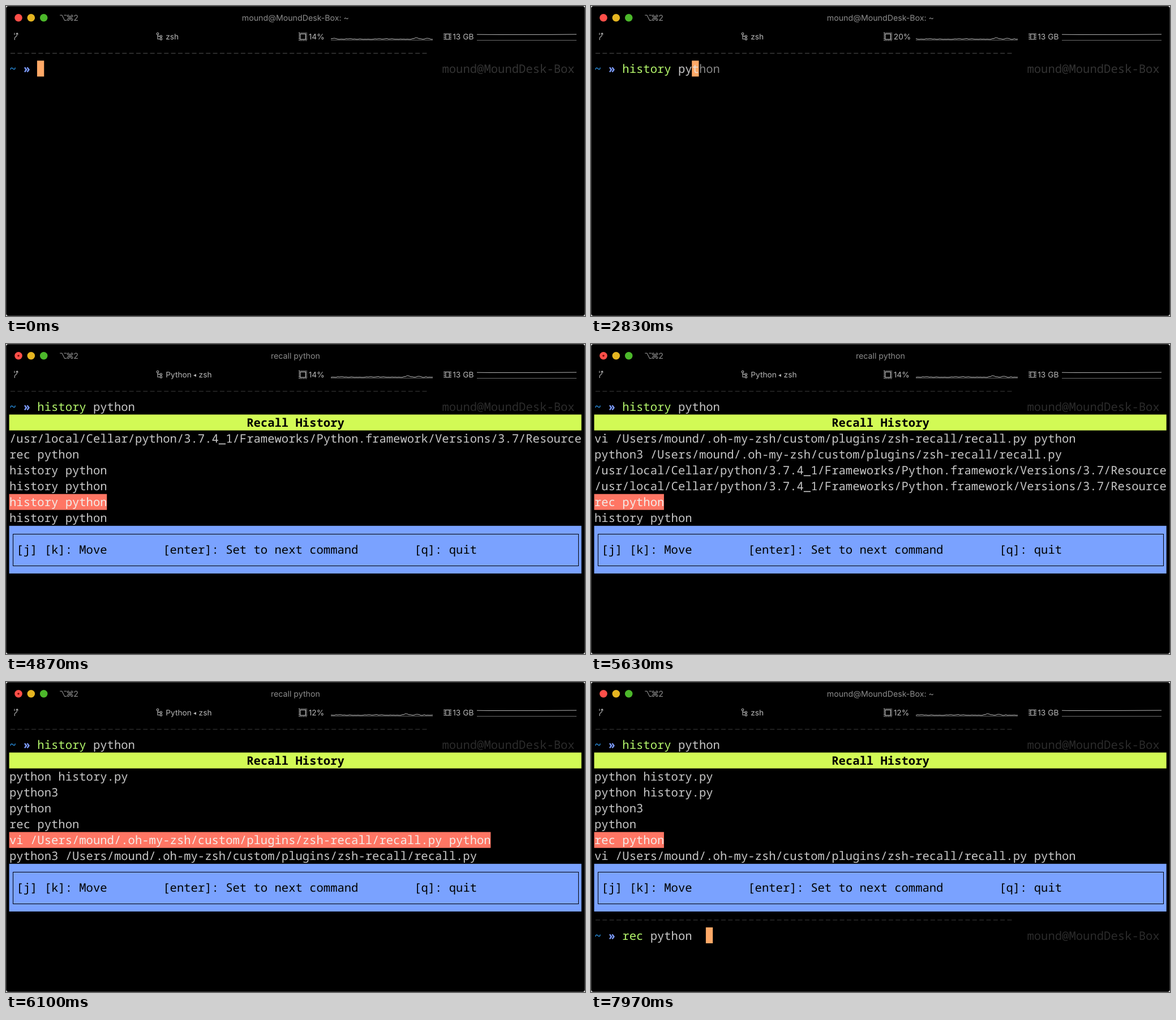
Write an HTML page that moves like this. It is 1023 px wide and 547 px high and loops after 8000 ms.

```html
<!DOCTYPE html>
<html lang="en">
<head>
<meta charset="utf-8">
<title>Recall history</title>
<style>
  html, body { margin: 0; width: 100%; height: 100%; overflow: hidden; background: #fff; }
  svg { display: block; width: 1023px; height: 547px; }
  text { white-space: pre; text-rendering: geometricPrecision; }
  .term text { font: 20.55px "Noto Sans Mono", "DejaVu Sans Mono", monospace; }
  .term .bold { font-weight: 600; }
  .ui { font: 13.7px Inter, Roboto, "DejaVu Sans", sans-serif; fill: #b8b8b8; }
  .title { font-size: 14.2px; fill: #8c8c8c; }
  .icon { fill: none; stroke: #b8b8b8; stroke-width: 1.1; }
  .base { stroke: #6c6c6c; }
  .spark { fill: none; stroke: #b4b4b4; stroke-linejoin: round; }
</style>
</head>
<body>
<svg viewBox="0 0 1023 547">
  <rect x=".5" y=".5" width="1022" height="546" rx="3.5" stroke="#3a3a3a"/>
  <circle cx="22" cy="20.7" r="6.8" fill="#ff4f49"/>
  <circle cx="44.3" cy="20.7" r="6.8" fill="#e5b521"/>
  <circle cx="66.7" cy="20.7" r="6.8" fill="#4cb82b"/>
  <circle id="busy" cx="22" cy="20.7" r="1.8" fill="#7a0d08"/>

  <g class="icon">
    <path d="M15 47.5v3.5M15.2 60v-2.5q0-2.5 2.2-3.6t2.2-3.4v-2.5M17.6 50l2-2.4 2 2.4"/>
    <circle cx="268" cy="49" r="1.8"/>
    <circle cx="274" cy="53.4" r="1.7"/>
    <circle cx="274" cy="58.2" r="1.7"/>
    <path d="M268 50.8v7.4h4.2M268 53.4h4.2"/>
    <rect x="519.8" y="49.3" width="9.6" height="9.6" stroke-width="1.2"/>
    <rect x="518" y="47.5" width="13.2" height="13.2" stroke-width="2" stroke-dasharray="1 1.64"/>
    <rect x="777" y="49.5" width="6.2" height="9.4"/>
    <path d="M774.8 49v11M785.4 49v11" stroke-width="3" stroke-dasharray="1.2 1.7"/>
    <path d="M773.3 49.4h13.6"/>
  </g>
  <g class="ui">
    <text class="title" x="94 106 119.3" y="26">⌥⌘2</text>
    <text class="title" id="title" x="511.4" y="26" text-anchor="middle"></text>
    <text id="job" x="282.3" y="59">zsh</text>
    <g id="parent">
      <text x="331" y="58" font-size="10">◂</text>
      <text x="340.6" y="59">zsh</text>
    </g>
    <text id="cpu" x="534.8" y="59"></text>
    <text x="789.3" y="59">13 GB</text>
  </g>
  <path class="base" d="M574 60.2H754M832 60.5H1008"/>
  <path class="spark" id="load"/>
  <path class="spark" id="memory"/>
  <g class="term" id="term"></g>
</svg>
<script>
const LOOP = 8000, CELL = 12.33, LINE = 28.05, LEFT = 6, TOP = 96.4, COLS = 82;
const USER = 'mound', HOST = 'MoundDesk-Box';
const COMMAND = 'history python';
const GREY = '#c7c7c7', GREEN = '#b5f86c', ORANGE = '#ffa967', SALMON = '#ff7664';

const SCRIPT = `/Users/${USER}/.oh-my-zsh/custom/plugins/zsh-recall/recall.py`;
const FRAMEWORK = '/usr/local/Cellar/python/3.7.4_1/Frameworks/Python.framework/Versions/3.7/Resources'.slice(0, COLS);
const HISTORY = [
  'python history.py', 'python history.py', 'python3', 'python', 'rec python',
  `vi ${SCRIPT} python`, `python3 ${SCRIPT}`, FRAMEWORK, FRAMEWORK, 'rec python',
  COMMAND, COMMAND, COMMAND, COMMAND
];
const VISIBLE = 6;

// Event times in ms.
const KEYS = [1080, 1200, 1310, 1420, 1540, 1650, 1780, 1980, 2480, 2640, 2920, 3040, 3150, 3260];
const MOVES = [4620, 4950, 5230, 5500, 5760, 5920, 6000, 6090, 6330];
const ENTER = 3800, MENU = 4190, JOB = 4770, QUIT = 7150, SPACE = 7650, JOB_END = 7200;
const TICK = 770;
const CPU = [14, 14, 16, 20, 14, 14, 12, 12, 12];

const $ = id => document.getElementById(id);
const count = (times, t) => times.filter(s => s <= t).length;
const rowY = row => TOP + row * LINE;
const colX = col => LEFT + col * CELL;

const text = (col, row, str, fill, cls = '') =>
  `<text class="${cls}" x="${colX(col)}" y="${rowY(row) + 21.6}" fill="${fill}">${str}</text>`;
const block = (col, row, cols, rows, fill) =>
  `<rect x="${colX(col) - .4}" y="${rowY(row)}" width="${cols * CELL}" height="${rows * LINE}" fill="${fill}"/>`;
const cursor = (col, row) => block(col, row, 1, 1, ORANGE);

function prompt(row, dim) {
  const y = rowY(row) - 12.9;
  return `<path d="M8 ${y}H745" stroke="${dim ? '#2a2a2a' : '#3a3a3a'}" stroke-width="1.5" stroke-dasharray="8 4.33"/>`
    + text(0, row, '~', '#2580c8', 'bold') + text(2, row, '»', '#7d9cff', 'bold')
    + text(62, row, `${USER}@${HOST}`, dim ? '#2b2b2b' : '#333');
}

function commandLine(t) {
  const n = count(KEYS, t);
  const typed = COMMAND.slice(0, n);
  const hint = n ? COMMAND.slice(n, n < 8 ? 7 : undefined) : '';
  let out = t < ENTER ? cursor(4 + n, 0) : '';
  out += text(4, 0, typed.slice(0, 7), n < 7 ? SALMON : GREEN);
  out += text(12, 0, typed.slice(8), GREY);
  out += text(4 + n, 0, hint.slice(0, 1), '#e8e0d8');
  out += text(5 + n, 0, hint.slice(1), '#858585');
  return out;
}

function menu(t) {
  const selected = HISTORY.length - 1 - count(MOVES, t);
  const first = Math.min(selected - 4, HISTORY.length - VISIBLE);
  let out = block(0, 1, COLS, 1, '#d2fa55') + text(34, 1, 'Recall History', '#000', 'bold');
  HISTORY.slice(first, first + VISIBLE).forEach((line, i) => {
    const on = first + i === selected;
    if (on) out += block(0, 2 + i, line.length, 1, SALMON);
    out += text(0, 2 + i, line, on ? '#f2ece8' : GREY);
  });
  out += block(0, 8, COLS, 3, '#7aa2ff');
  out += `<rect x="12.5" y="335.5" width="999" height="56" fill="none" stroke="#000"/>`;
  out += text(1, 9, '[j] [k]: Move', '#000') + text(22, 9, '[enter]: Set to next command', '#000')
    + text(58, 9, '[q]: quit', '#000');
  return out;
}

function terminal(t) {
  const open = t >= MENU;
  let out = prompt(0, open) + commandLine(t);
  if (open) out += menu(t);
  else if (t >= ENTER) out += cursor(0, 1);
  if (t >= QUIT) {
    out += prompt(12, true) + text(4, 12, 'rec', GREEN) + text(8, 12, 'python', GREY);
    out += cursor(t < SPACE ? 15 : 16, 12);
  }
  return out;
}

const noise = k => { const s = Math.sin(k * 12.9898) * 43758.5453; return s - Math.floor(s); };
const bump = (k, at, height, width) => height * Math.exp(-(((k - at) / width) ** 2));

// CPU load history; sample 0 is the newest one at the start of the loop.
const load = k => .6 + 1.4 * noise(k) ** 2
  + bump(k, -9.8, 3.1, 1.3) + bump(k, -3.4, 2, .8) + bump(k, -58, 1.3, 1) + bump(k, -31, .9, 1);

function sparklines(tick) {
  let d = '';
  for (let i = 0; i <= 60; i++) d += `${i ? 'L' : 'M'}${574 + 3 * i} ${(59.4 - load(i - 60 + tick)).toFixed(2)}`;
  $('load').setAttribute('d', d);
  const shift = 3 * tick;
  $('memory').setAttribute('d', `M832 50.2L${870 - shift} 50.5L${960 - shift} 50.4L1008 50`);
}

const show = (id, on) => $(id).setAttribute('visibility', on ? 'visible' : 'hidden');

function draw(t) {
  const tick = t < TICK ? 0 : 1 + Math.floor((t - TICK) / 1000);
  const running = t >= JOB && t < JOB_END;
  $('title').textContent = t >= ENTER && t < QUIT ? 'recall python' : `${USER}@${HOST}: ~`;
  $('job').textContent = running ? 'Python' : 'zsh';
  show('parent', running);
  show('busy', running);
  $('cpu').textContent = CPU[tick] + '%';
  sparklines(tick);
  $('term').innerHTML = terminal(t);
}

const start = performance.now();
const events = [...KEYS, ...MOVES, ENTER, MENU, JOB, QUIT, SPACE, JOB_END, ...CPU.slice(1).map((_, i) => TICK + 1000 * i)];
let last = -1;
function frame() {
  const t = (performance.now() - start) % LOOP;
  const step = count(events, t);
  if (step !== last) {
    draw(t);
    last = step;
  }
  requestAnimationFrame(frame);
}
frame();
</script>
</body>
</html>
```
